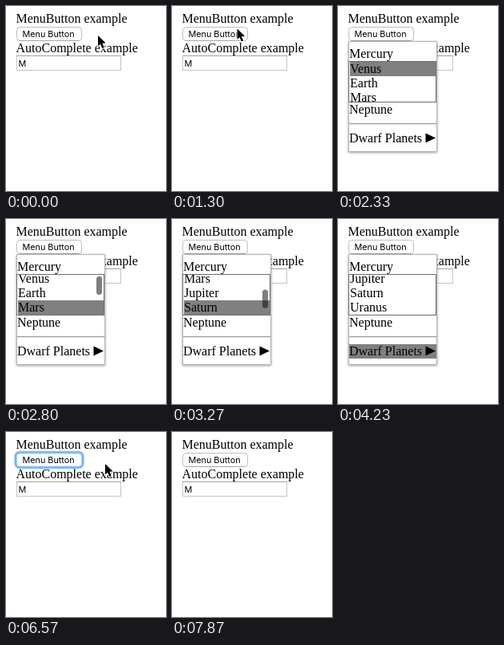
These frames come from a looping animation (200x232 px, 8260 ms). An HTML page with a canvas:

```html
<!DOCTYPE html>
<html lang="en">
<head>
<meta charset="utf-8">
<title>Menu button</title>
<style>
html, body { margin: 0; width: 100%; height: 100%; overflow: hidden; background: #fff; }
canvas { display: block; width: 200px; height: 232px; }
</style>
</head>
<body>
<canvas id="stage" width="200" height="232"></canvas>
<script>
const ctx = document.getElementById('stage').getContext('2d');
const LOOP = 8260;
const SERIF = '16px "Liberation Serif", serif';
const UI = '10.8px Inter, sans-serif';
const GRAY = '#808080';
const ROW = 18;

const OPEN = 1570, SUBMENU = 4370, CLOSE = 5430;
const scrollItems = ['Venus', 'Earth', 'Mars', 'Jupiter', 'Saturn', 'Uranus'];
const dwarfs = ['Ceres', 'Pluto', 'Eris'];
const view = { top: 70, height: 50 };

// Time at which each entry of the main menu becomes current
const picks = [1970, 2330, 2530, 2770, 2970, 3270, 3470, 3700, 3930];
const dwarfPicks = [SUBMENU, 4600, 4800];

// Pointer legs: start, end, from, to
const legs = [
  [0, 230, [114, 36], [80.5, 27.5]],
  [230, 1970, [80.5, 27.5], [80.5, 27.5]],
  [6270, 6570, [81, 27], [123, 39]],
  [6570, 7170, [123, 39], [123, 39]],
  [7170, 7300, [123, 39], [184, 4]]
];

const clamp = v => Math.max(0, Math.min(1, v));
const progress = (t, a, b) => clamp((t - a) / (b - a));
const ease = p => p * p * (3 - 2 * p);
const current = (times, t) => times.filter(s => t >= s).length - 1;

function text(str, x, y, font = SERIF) {
  ctx.font = font;
  ctx.fillStyle = '#000';
  ctx.fillText(str, x, y);
}

function rect(x, y, w, h, color) {
  ctx.fillStyle = color;
  ctx.fillRect(x, y, w, h);
}

function frame(x, y, w, h, color) {
  ctx.strokeStyle = color;
  ctx.lineWidth = 1;
  ctx.strokeRect(x + 0.5, y + 0.5, w - 1, h - 1);
}

function rounded(x, y, w, h, r) {
  ctx.beginPath();
  ctx.roundRect(x, y, w, h, r);
}

function item(label, x, y, w, active) {
  if (active) rect(x, y, w, ROW, GRAY);
  text(label, x, y + 14);
}

function drawButton(t) {
  const ring = t >= CLOSE ? 1 - progress(t, 6870, 6930) : 0;
  const pressed = t >= 1470 && t < OPEN;
  rounded(13.5, 26.5, 81, 17, 4);
  ctx.fillStyle = pressed ? '#e4e4e4' : '#fff';
  ctx.fill();
  ctx.strokeStyle = '#bcbcbc';
  ctx.lineWidth = 1;
  ctx.stroke();
  rect(17, 43, 74, 1, '#a5a5a5');
  if (ring > 0) {
    ctx.globalAlpha = ring;
    rounded(12, 25.5, 84, 19, 5);
    ctx.strokeStyle = '#b4d6f8';
    ctx.lineWidth = 4;
    ctx.stroke();
    ctx.strokeStyle = '#77b1ec';
    ctx.lineWidth = 2;
    ctx.stroke();
    ctx.globalAlpha = 1;
  }
  text('Menu Button', 20.5, 39, UI);
}

function drawPage(t) {
  rect(0, 0, 200, 232, '#fff');
  text('MenuButton example', 12.5, 21);
  text('AutoComplete example', 12.5, 58);
  frame(13, 62, 131, 19, '#c4c4c4');
  rect(13, 62, 131, 1, '#a0a0a0');
  text('M', 15.5, 76, UI);
  drawButton(t);
}

function panel(x, y, w, h) {
  ctx.save();
  ctx.shadowColor = 'rgba(0,0,0,.4)';
  ctx.shadowBlur = 3;
  ctx.shadowOffsetY = 1;
  rect(x, y, w, h, '#fff');
  ctx.restore();
  frame(x, y, w, h, '#b4b4b4');
}

function drawList(t, index) {
  const last = Math.min(index, scrollItems.length);
  const scroll = Math.max(0, last * ROW - view.height);
  ctx.save();
  ctx.beginPath();
  ctx.rect(14, view.top, 109, view.height);
  ctx.clip();
  scrollItems.forEach((label, i) =>
    item(label, 15, view.top + i * ROW - scroll, 108, index === i + 1));
  if (scroll > 0) {
    const ratio = view.height / (scrollItems.length * ROW);
    ctx.globalAlpha = 0.5 * (1 - progress(t, 4070, 4230));
    rounded(113, view.top + scroll * ratio, 7, view.height * ratio, 3.5);
    ctx.fillStyle = '#000';
    ctx.fill();
  }
  ctx.restore();
  frame(13, 69, 110, 52, '#6e6e6e');
}

function drawMenu(t) {
  const index = current(picks, t);
  panel(13, 44, 111, 139);
  item('Mercury', 14, 51, 109, index === 0);
  drawList(t, index);
  item('Neptune', 14, 121, 109, index === 7);
  rect(14, 147, 109, 1, '#9a9a9a');
  rect(14, 148, 109, 1, '#e8e8e8');
  item('Dwarf Planets', 14, 157, 109, index === 8);
  ctx.fillStyle = '#000';
  ctx.beginPath();
  ctx.moveTo(109.5, 159.5);
  ctx.lineTo(122, 165.5);
  ctx.lineTo(109.5, 171.5);
  ctx.fill();
  if (t >= SUBMENU) {
    const chosen = current(dwarfPicks, t);
    panel(124, 157, 39, 68);
    dwarfs.forEach((label, i) => item(label, 125, 164 + i * ROW, 37, chosen === i));
  }
}

function drawPointer(t) {
  const leg = legs.find(([a, b]) => t >= a && t < b);
  if (!leg) return;
  const [a, b, from, to] = leg;
  const p = ease(progress(t, a, b));
  ctx.save();
  ctx.translate(from[0] + (to[0] - from[0]) * p, from[1] + (to[1] - from[1]) * p);
  const shape = [[1, 1], [1, 14.5], [4, 11.7], [6.3, 17], [8.7, 16], [6.4, 10.8], [10.6, 10.6]];
  ctx.beginPath();
  shape.forEach(([x, y]) => ctx.lineTo(x, y));
  ctx.closePath();
  ctx.lineJoin = 'round';
  ctx.lineWidth = 2;
  ctx.strokeStyle = '#fff';
  ctx.stroke();
  ctx.fillStyle = '#000';
  ctx.fill();
  ctx.restore();
}

const start = performance.now();

function draw() {
  const t = (performance.now() - start) % LOOP;
  drawPage(t);
  if (t >= OPEN && t < CLOSE) drawMenu(t);
  drawPointer(t);
  requestAnimationFrame(draw);
}
draw();
</script>
</body>
</html>
```
